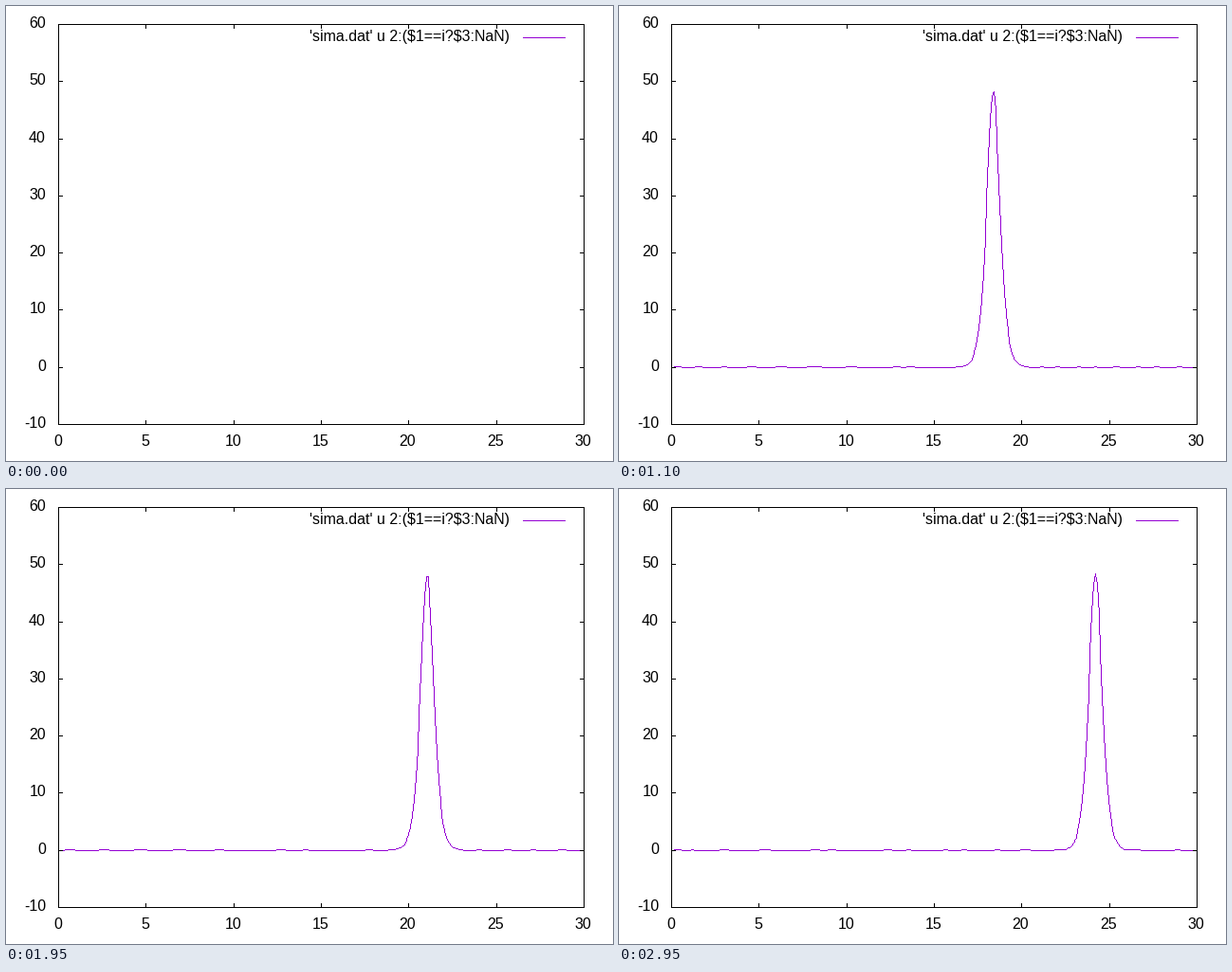
Animation of 640x480 px, one loop 3000 ms. Source, as a matplotlib script:

```python
import numpy as np
import matplotlib.pyplot as plt
from matplotlib.animation import FuncAnimation

plt.rcParams["font.family"] = "Liberation Sans"

W, H, DPI = 640, 480, 80
FRAMES, INTERVAL = 60, 50
LEFT, RIGHT, TOP, BOTTOM = 55, 609, 19, 441
PURPLE = "#9400d3"
PURPLE_RGBA = (0x94, 0x00, 0xD3, 255)
PX = 72 / DPI  # one pixel in points

# Soliton on a periodic domain
SPAN, N, WRAPS = 30.0, 300, 8
DX = SPAN / N
X = np.arange(N) * DX
K = 2 * np.pi * np.fft.rfftfreq(N * WRAPS, DX)
PEAK, START, SPEED, DT = 48.4, 15.057, 0.1576, 0.01

# Weak dispersive waves shed to the left, with no net mass
SOURCE = 14.45 + SPAN * (WRAPS - 1)
SHED = 0.26 * (np.exp(-0.0185 * K**2) - np.exp(-0.245 * K**2))
SHIFT = 4 * np.arctan2(4, K)  # phase shift per pass through the soliton


def to_px(x, y):
    px = LEFT + (RIGHT - LEFT) * np.asarray(x) / 30
    py = BOTTOM - (BOTTOM - TOP) * (np.asarray(y) + 10) / 70
    return np.rint(px).astype(int), np.rint(py).astype(int)


def waves(t, passes):
    """Linear waves on the unwrapped domain, one row per wrap."""
    phase = K**3 * t - K * SOURCE - passes * SHIFT
    spectrum = SHED / DX * np.exp(1j * phase)
    return np.fft.irfft(spectrum, N * WRAPS).reshape(WRAPS, N)[::-1]


def profile(step):
    pos = START + SPEED * step
    u = PEAK / np.cosh(2 * (X - pos)) ** 2
    if step:
        rows = [waves(DT * step, n)[n:n + 2] for n in range(WRAPS)]
        for n in range(WRAPS):
            ahead = rows[n - 1][1] if n else rows[0][0]
            u += np.where(X < pos, rows[n][0], ahead)
    return u


def raster(px, py):
    """One-pixel-wide line through integer points, as an RGBA layer."""
    layer = np.zeros((H, W, 4), np.uint8)
    for x0, y0, x1, y1 in zip(px, py, px[1:], py[1:]):
        n = max(abs(x1 - x0), abs(y1 - y0)) + 1
        xs = np.rint(np.linspace(x0, x1, n)).astype(int)
        ys = np.rint(np.linspace(y0, y1, n)).astype(int)
        layer[ys, xs] = PURPLE_RGBA
    return layer


fig = plt.figure(figsize=(W / DPI, H / DPI), dpi=DPI, facecolor="white")
curve = fig.figimage(np.zeros((H, W, 4), np.uint8), origin="upper", zorder=-1)
ax = fig.add_axes([0, 0, 1, 1])
ax.set_xlim(0, W)
ax.set_ylim(H, 0)
ax.axis("off")


def stroke(xs, ys, color="black"):
    ax.plot(np.asarray(xs) + 0.5, np.asarray(ys) + 0.5, color=color,
            lw=PX, antialiased=False, snap=False,
            solid_capstyle="projecting", solid_joinstyle="miter")


def label(x, y, text, align):
    ax.text(x, y, text, size=16 * PX, ha=align, va="baseline", color="black")


stroke([LEFT, RIGHT, RIGHT, LEFT, LEFT], [TOP, TOP, BOTTOM, BOTTOM, TOP])
for v in range(0, 31, 5):
    x, _ = to_px(v, 0)
    stroke([x, x], [BOTTOM, BOTTOM - 4])
    stroke([x, x], [TOP, TOP + 4])
    label(x - 0.5, 464, str(v), "center")
for v in range(-10, 61, 10):
    _, y = to_px(0, v)
    stroke([LEFT, LEFT + 4], [y, y])
    stroke([RIGHT, RIGHT - 4], [y, y])
    label(42, y + 4, str(v), "right")

label(531.5, 37, r"'sima.dat' u 2:(\$1==i?\$3:NaN)", "right")
stroke([545, 589], [33, 33], PURPLE)


def update(frame):
    if frame == 0:
        curve.set_data(np.zeros((H, W, 4), np.uint8))
    else:
        curve.set_data(raster(*to_px(X, profile(frame - 1))))
    return curve,


anim = FuncAnimation(fig, update, frames=FRAMES, interval=INTERVAL,
                     repeat=True, repeat_delay=0, blit=False)
plt.show()
```
